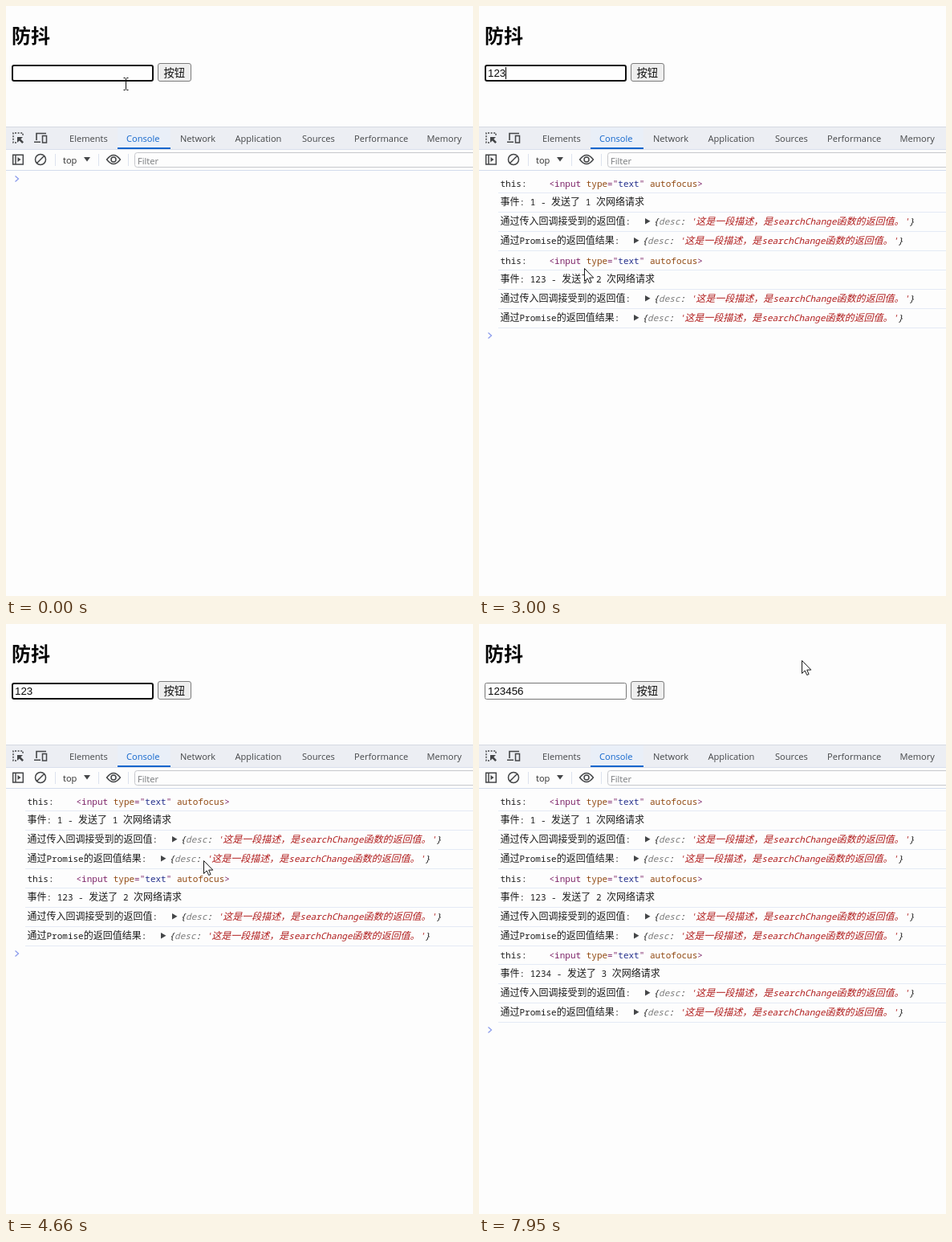
These frames come from a looping animation (582x734 px, 7.99 s). An HTML page with a canvas:

```html
<!DOCTYPE html>
<html lang="zh-CN">
<head>
<meta charset="utf-8">
<title>防抖</title>
<style>
html, body { margin: 0; width: 100%; height: 100%; overflow: hidden; background: #fdfdfd; }
canvas { display: block; }
</style>
</head>
<body>
<canvas id="stage" width="582" height="734"></canvas>
<script>
const ctx = document.getElementById('stage').getContext('2d');
const LOOP = 7990;
const BLINK = 530;
const BLUR = 7440;
const PAGE = '#fdfdfd', INK = '#1c1c1c', ICON = '#444648', BLUE = '#1266cc';
const TAG = '#7d2468', ATTR = '#914a12', VALUE = '#24308c', STRING = '#b01c1c';
const CJK = '"Noto Sans CJK SC", "Noto Sans CJK", sans-serif';
const MONO = '"Noto Sans Mono", "DejaVu Sans Mono", monospace';
const UI = '"Open Sans", "Noto Sans", sans-serif';
const ARIAL = '"Liberation Sans", sans-serif';

const KEYS = [1300, 1820, 1880, 6450, 6690, 7060];
const LOGS = [
  { at: 1340, value: '1' },
  { at: 2230, value: '123' },
  { at: 6490, value: '1234' }
];
// time, x, y of the pointer
const PATH = [
  [0, 149, 97], [40, 149, 97], [160, 152, 138], [450, 152, 138], [850, 160, 298],
  [1820, 160, 298], [2270, 156, 295], [2560, 176, 400], [3000, 131, 326],
  [3400, 215, 384], [3800, 290, 370], [4220, 304, 302], [4600, 250, 300],
  [5230, 109, 89], [6690, 109, 89], [7460, 210, 75], [7540, 212, 77],
  [7780, 212, 77], [7950, 402, 45]
];

function text(str, x, y, font, color) {
  ctx.font = font;
  ctx.fillStyle = color;
  ctx.fillText(str, x, y);
}

// Console text: Latin and CJK runs use different fonts; returns the end x.
function code(str, x, y, color = INK, style = '') {
  for (const run of str.match(/[\u3000-\uffef]+|[^\u3000-\uffef]+/g)) {
    const wide = run.charCodeAt(0) >= 0x3000;
    text(run, x, y, `${style} ${wide ? '12px ' + CJK : '11px ' + MONO}`, color);
    x += ctx.measureText(run).width;
  }
  return x;
}

function rect(x, y, w, h, color) {
  ctx.fillStyle = color;
  ctx.fillRect(x, y, w, h);
}

function box(x, y, w, h, r, fill, stroke, line = 1) {
  ctx.beginPath();
  ctx.roundRect(x, y, w, h, r);
  ctx.fillStyle = fill;
  ctx.fill();
  ctx.strokeStyle = stroke;
  ctx.lineWidth = line;
  ctx.stroke();
}

function path(d, color, line = 1.5) {
  const p = new Path2D(d);
  if (line) {
    ctx.strokeStyle = color;
    ctx.lineWidth = line;
    ctx.stroke(p);
  } else {
    ctx.fillStyle = color;
    ctx.fill(p);
  }
}

function drawPage(t) {
  text('防抖', 7, 46, 'bold 24px ' + CJK, '#050505');

  if (t < BLUR) box(8, 74, 175, 19, 2, '#fefefe', '#101010', 2);
  else box(7.5, 73.5, 176, 20, 2, '#fefefe', '#767676');

  const typed = KEYS.filter(k => k <= t);
  const value = '123456'.slice(0, typed.length);
  text(value, 11, 88, '13.333px ' + ARIAL, '#080808');
  if (typed.length && t < BLUR) {
    const since = t - typed[typed.length - 1];
    if (Math.floor(since / BLINK) % 2 === 0) {
      rect(Math.round(11 + ctx.measureText(value).width), 76, 1, 15, '#000');
    }
  }

  box(189.5, 71.5, 41, 22, 2.5, '#eeeeee', '#7c7c7c');
  text('按钮', 196.5, 88, '13.333px ' + CJK, '#101010');
}

function drawTabs() {
  rect(0, 150, 582, 28, '#eceef3');
  rect(0, 150, 582, 1, '#d5d9e2');
  rect(139, 151, 66, 27, '#e9eff8');
  rect(0, 178, 582, 1, '#d9dfec');
  rect(139, 176, 66, 2, BLUE);

  const tabs = { Elements: 79, Console: 150, Network: 217, Application: 285.5,
    Sources: 369, Performance: 434, Memory: 524.5 };
  for (const name in tabs) {
    text(name, tabs[name], 168.5, '11.1px ' + UI, name === 'Console' ? BLUE : '#444648');
  }

  // element picker and device toolbar
  ctx.setLineDash([2, 1.6]);
  path('M13 170H9V158H21V162', ICON, 1.5);
  ctx.setLineDash([]);
  path('M14 163H21L18.4 165.5 22 169.2 20.2 171 16.6 167.4 14 170Z', ICON, 0);
  path('M38 167V158.5H50M35 169.2H43', ICON, 1.6);
  path('M45.5 161.5H50.5V170H45.5Z', ICON, 1.5);
}

function drawToolbar() {
  rect(0, 204, 582, 1, '#d3dcec');
  path('M8.7 185.2H21.3V197H8.7ZM12 185V197', ICON, 1.5);
  path('M14.5 188L18.5 191 14.5 194Z', ICON, 0);
  path('M49.5 191A6.5 6.5 0 1 1 36.5 191A6.5 6.5 0 1 1 49.5 191M38.5 195.5L47.5 186.5', ICON, 1.5);
  for (const x of [61, 115, 152]) rect(x, 184, 1, 15, '#dce2ee');
  text('top', 71, 196, '11.1px ' + UI, '#303030');
  path('M97 188H105L101 193.5Z', ICON, 0);
  path('M125.6 191Q134 180 142.4 191Q134 202 125.6 191Z', ICON, 1.5);
  path('M137 191A3 3 0 1 1 131 191A3 3 0 1 1 137 191', ICON, 1.5);
  box(160.5, 182.5, 440, 18, 3, '#fdfdfd', '#c6c8cc');
  text('Filter', 164, 196.5, '11.1px ' + UI, '#77797c');
}

function drawResult(label, arrow, y) {
  code(label + ':', 26.5, y);
  path(`M${arrow} ${y - 8}V${y - 0.5}L${arrow + 6.5} ${y - 4.2}Z`, ICON, 0);
  let x = code('{', arrow + 10.5, y, INK, 'italic');
  x = code('desc', x, y, '#7c7c7c', 'italic');
  x = code(': ', x, y, INK, 'italic');
  x = code("'这是一段描述，是searchChange函数的返回值。'", x, y, STRING, 'italic');
  code('}', x, y, INK, 'italic');
}

function drawLog(value, index) {
  const top = Math.round(index * 95.6);
  code('this:', 26.5, top + 225);
  let x = code('<input ', 87.5, top + 225, TAG);
  x = code('type', x, top + 225, ATTR);
  x = code('="', x, top + 225, TAG);
  x = code('text', x, top + 225, VALUE);
  x = code('" ', x, top + 225, TAG);
  x = code('autofocus', x, top + 225, ATTR);
  code('>', x, top + 225, TAG);

  code(`事件: ${value} - 发送了 ${index + 1} 次网络请求`, 26.5, top + 248);
  drawResult('通过传入回调接受到的返回值', 207, top + 272);
  drawResult('通过Promise的返回值结果', 193, top + 296);
  for (const y of [232, 256, 280, 304]) rect(24, top + y, 558, 1, '#e4eaf5');
}

function drawConsole(t) {
  const shown = LOGS.filter(log => log.at <= t);
  shown.forEach((log, i) => drawLog(log.value, i));
  const y = shown.length ? Math.round(218.5 + shown.length * 95.6) : 215;
  path(`M11.5 ${y - 3.5}L15.5 ${y}L11.5 ${y + 3.5}`, '#8c9cec', 1.3);
}

function pointerAt(t) {
  const i = PATH.findIndex(p => p[0] > t);
  if (i < 0) return PATH[PATH.length - 1].slice(1);
  const [t0, x0, y0] = PATH[i - 1], [t1, x1, y1] = PATH[i];
  const u = (t - t0) / (t1 - t0), k = u * u * (3 - 2 * u);
  return [x0 + (x1 - x0) * k, y0 + (y1 - y0) * k].map(Math.round);
}

function drawPointer(t) {
  const [x, y] = pointerAt(t);
  ctx.save();
  ctx.translate(x + 0.5, y + 0.5);
  if (x > 7 && x < 185 && y > 70 && y < 99) {
    path('M-3 -8H-1L0 -7L1 -8H3M0 -7V6M-3 7H-1L0 6L1 7H3', '#111', 1);
  } else {
    const arrow = 'M0 0V16L3.7 12.5L6.2 18L8.6 17L6.2 11.6H11.3Z';
    path(arrow, '#fefefe', 0);
    path(arrow, '#181818', 1);
  }
  ctx.restore();
}

function draw(now) {
  const t = now % LOOP;
  rect(0, 0, 582, 734, PAGE);
  drawPage(t);
  drawTabs();
  drawToolbar();
  drawConsole(t);
  drawPointer(t);
}

const start = performance.now();
function tick() {
  draw(performance.now() - start);
  requestAnimationFrame(tick);
}
tick();
</script>
</body>
</html>
```
